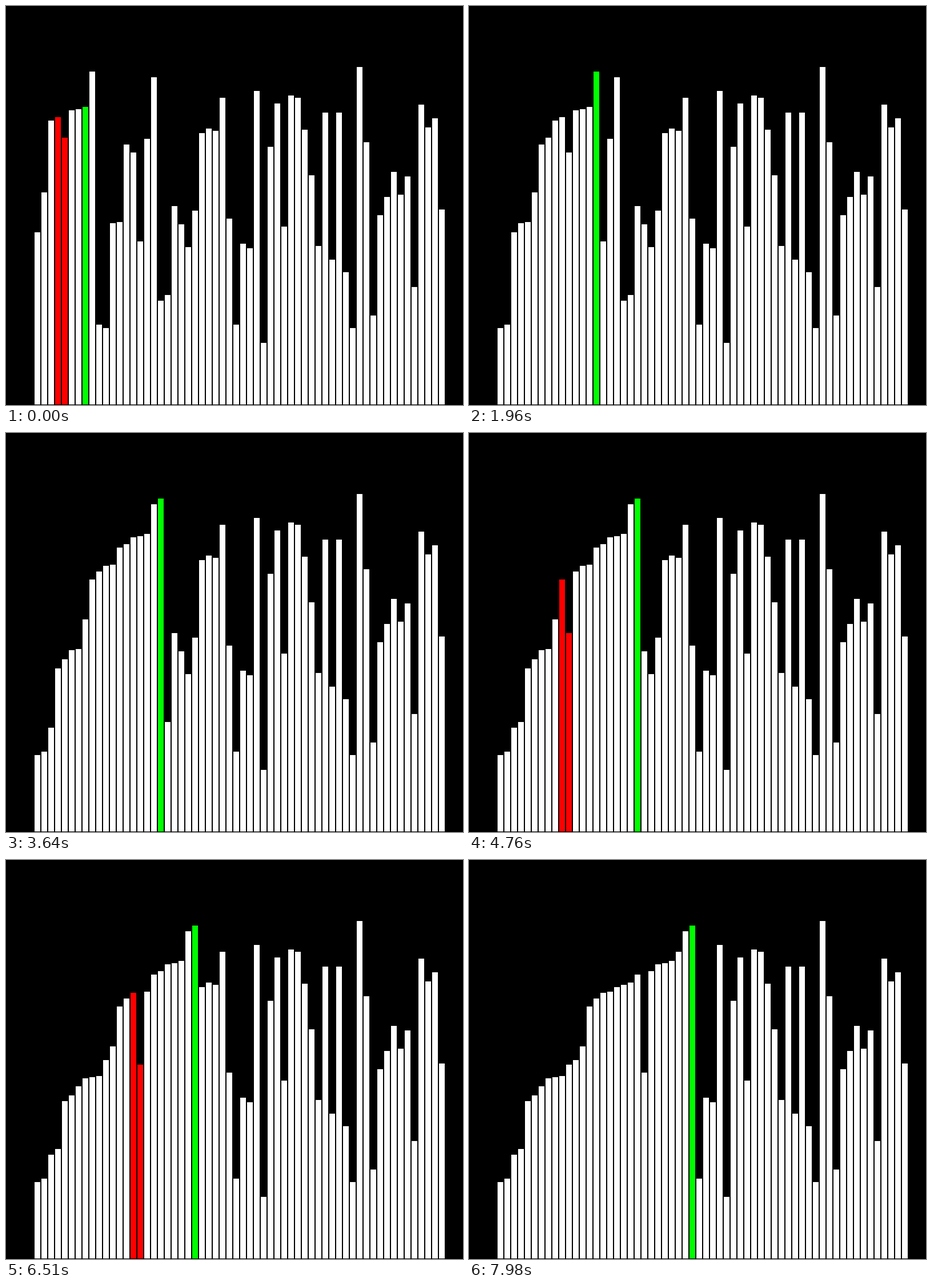
Recreate the animation shown at these times as a matplotlib script. Size 800 by 700 pixels, loop 8 s.

```python
import numpy as np
import matplotlib.pyplot as plt
from matplotlib.animation import FuncAnimation

W, H, DPI = 800, 700, 100
LOOP, INTERVAL, STEP = 8000, 20, 70
LEFT, PITCH, BAR = 50, 12, 10
WHITE, RED, GREEN = "#ffffff", "#ff0000", "#00ff00"

# The unsorted data; one unit is two pixels high
VALUES = [
    151, 186, 249, 252, 234, 258, 259, 261, 292, 70, 67, 159, 160, 228, 221,
    143, 233, 287, 91, 96, 174, 158, 138, 170, 238, 242, 240, 269, 163, 70,
    141, 137, 275, 54, 226, 264, 156, 271, 269, 241, 201, 139, 256, 127, 256,
    116, 67, 296, 230, 78, 166, 182, 204, 184, 200, 103, 263, 243, 251, 171,
]


def insertion_sort(values, i, j):
    """Yield (values, current, pair) before and after every swap."""
    v = list(values)
    while i < len(v):
        while j > 0 and v[j - 1] > v[j]:
            yield list(v), i, (j - 1, j)
            v[j - 1], v[j] = v[j], v[j - 1]
            yield list(v), i, ()
            j -= 1
        i += 1
        j = i


# Bar 7 is current, and its insertion has already reached slot 4
STATES = list(insertion_sort(VALUES, 7, 4))


def state_at(ms):
    """The sort runs steadily, a little slower for a moment past the middle."""
    tick = np.interp(ms // STEP, [0, 52, 68, 114], [0, 177, 230, 387.4])
    return STATES[round(tick)]


def color_of(k, current, pair):
    if k in pair:
        return RED
    return GREEN if k == current else WHITE


fig = plt.figure(figsize=(W / DPI, H / DPI), dpi=DPI, facecolor="black")
ax = fig.add_axes([0, 0, 1, 1])
bars = ax.bar(LEFT + PITCH * np.arange(len(VALUES)), VALUES, width=BAR,
              bottom=1, align="edge", linewidth=0, antialiased=False)
ax.set(xlim=(0, W), ylim=(0, H))
ax.axis("off")


def update(frame):
    values, current, pair = state_at(frame * INTERVAL + INTERVAL // 2)
    for k, (bar, value) in enumerate(zip(bars, values)):
        bar.set_height(2 * value)
        bar.set_facecolor(color_of(k, current, pair))
    return list(bars)


anim = FuncAnimation(fig, update, frames=LOOP // INTERVAL,
                     init_func=lambda: update(0), interval=INTERVAL,
                     repeat=True, repeat_delay=0, blit=False)
plt.show()
```
